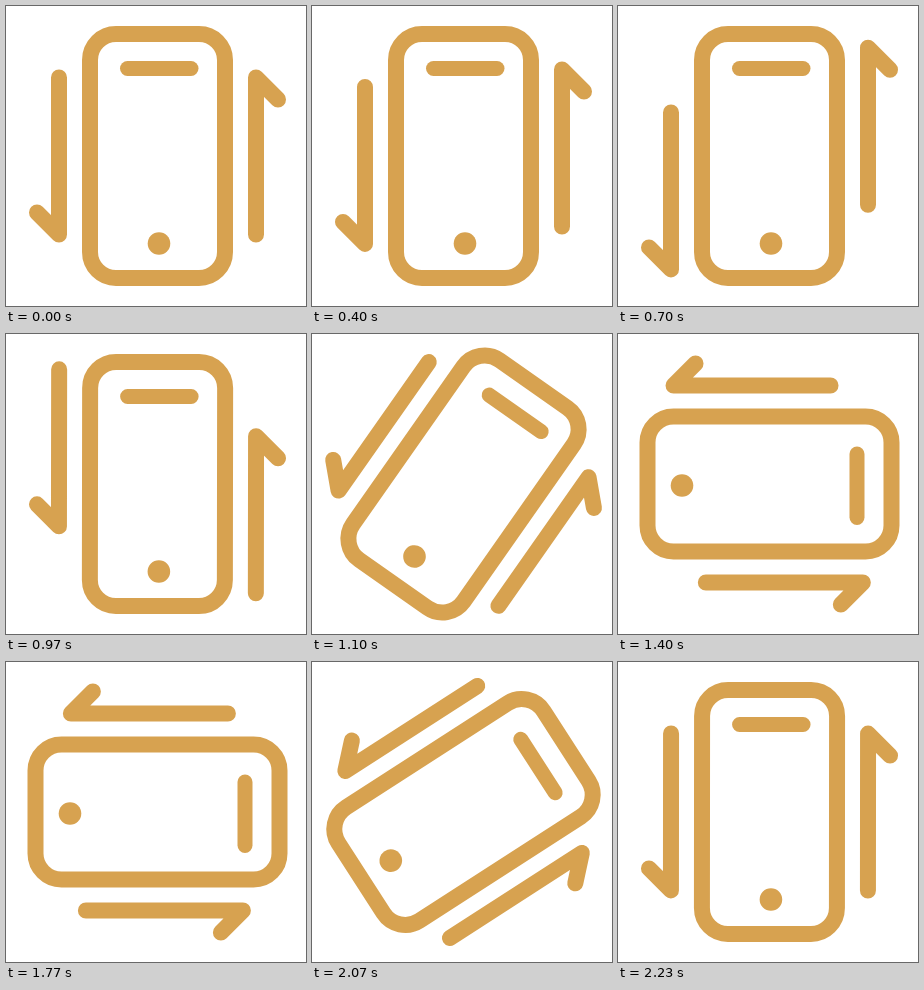
Recreate the animation shown at these times as an HTML page with a canvas. Size 300 by 300 pixels, loop 2370 ms.

```html
<!DOCTYPE html>
<html>
<head>
<meta charset="utf-8">
<title>Rotate phone</title>
<style>
html, body { margin: 0; width: 100%; height: 100%; overflow: hidden; background: #fff; }
canvas { display: block; width: 300px; height: 300px; }
</style>
</head>
<body>
<canvas id="stage" width="300" height="300"></canvas>
<script>
const ctx = document.getElementById('stage').getContext('2d');
const LOOP = 2370;
const COLOR = '#d7a250';

const progress = (k, from, to) => Math.min(1, Math.max(0, (k - from) / (to - from)));

function inOut(k, from, to) {
  const t = progress(k, from, to);
  return t < 0.5 ? 4 * t ** 3 : 1 - 4 * (1 - t) ** 3;
}

// Quick start with a long settling tail
function settle(k, from, to) {
  const s = Math.sin(progress(k, from, to) * Math.PI / 2);
  return s * s * (3 - 2 * s);
}

// Arrow swing: forward, far back, then home
const swing = k => settle(k, 0, 9.2) - 2 * inOut(k, 9.5, 19.3) + inOut(k, 19.3, 24);

function line(width, ...pts) {
  ctx.lineWidth = width;
  ctx.beginPath();
  pts.forEach(([x, y]) => ctx.lineTo(x, y));
  ctx.stroke();
}

function phone() {
  ctx.lineWidth = 16;
  ctx.beginPath();
  ctx.roundRect(-67.5, -122, 135, 244, 26);
  ctx.stroke();
  line(15, [-30, -87.5], [33.5, -87.5]);
  ctx.beginPath();
  ctx.arc(1.5, 87.5, 11.3, 0, Math.PI * 2);
  ctx.fill();
}

// side: -1 left arrow pointing down, 1 right arrow pointing up
function arrow(side, shift) {
  const x = side * 98.5;
  line(16, [x, side * 78.5 + shift], [x, -side * 78.5 + shift],
    [x + side * 22, -side * 56.5 + shift]);
}

function draw(ms) {
  const k = Math.floor(ms * 0.03 + 0.15); // 30 steps a second
  const angle = 90 * (inOut(k, 28.4, 38.4) - inOut(k, 57.5, 67.5));
  const move = swing(k < 39 ? k - 10 : k - 39);

  ctx.setTransform(1, 0, 0, 1, 0, 0);
  ctx.fillStyle = '#fff';
  ctx.fillRect(0, 0, 300, 300);
  ctx.translate(151.5, 150);
  ctx.rotate(angle * Math.PI / 180);
  ctx.strokeStyle = ctx.fillStyle = COLOR;
  ctx.lineCap = ctx.lineJoin = 'round';
  phone();
  arrow(-1, 36 * move);
  arrow(1, -30.6 * move);
}

const start = performance.now();
function tick() {
  draw((performance.now() - start) % LOOP);
  requestAnimationFrame(tick);
}
tick();
</script>
</body>
</html>
```
